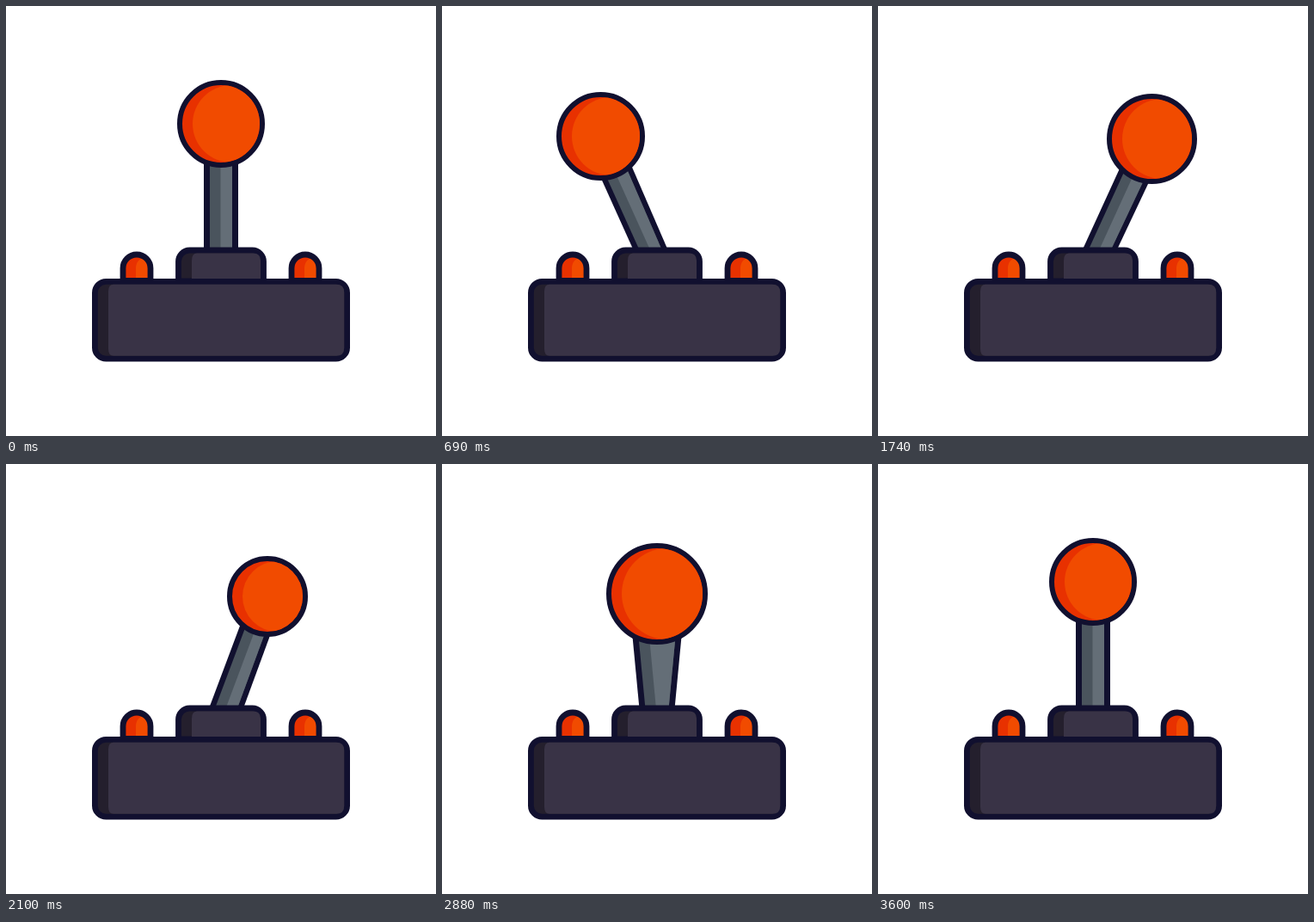
Write an HTML page without scripts that moves like this. It is 500 by 500 pixels and loops after 5630 ms.

```html
<!DOCTYPE html>
<html lang="en">
<head>
<meta charset="utf-8">
<title>Joystick</title>
<style>
@property --x { syntax: "<length>"; inherits: true; initial-value: 250px; }
@property --y { syntax: "<length>"; inherits: true; initial-value: 137px; }
@property --r { syntax: "<length>"; inherits: true; initial-value: 51.3px; }
@property --w { syntax: "<length>"; inherits: true; initial-value: 16px; }

html, body { margin: 0; width: 100%; height: 100%; overflow: hidden; background: #fff; }

/* x, y: knob centre; r: knob radius; w: half width of the rod at the knob */
.stage {
  --ink: #11102f;
  --red: #e83100;
  --orange: #f14b00;
  position: relative;
  width: 500px;
  height: 500px;
  overflow: hidden;
  animation: tilt 5630ms infinite;
}
.stage > * { position: absolute; inset: 0; }
svg { display: block; width: 500px; height: 500px; }

/* rod edges run from the knob centre down to y = 290 */
.rod {
  --foot: calc(232.5px + var(--x) * .07);
  background: var(--ink);
  clip-path: polygon(
    calc(var(--x) + var(--l)) var(--y),
    calc(var(--x) + var(--rt)) var(--y),
    calc(var(--foot) + var(--fr)) 290px,
    calc(var(--foot) + var(--fl)) 290px);
}
.edge { --l: calc(-4px - var(--w)); --rt: calc(var(--w) + 4px); --fl: -20px; --fr: 20px; }
.shade { --l: calc(3px - var(--w)); --rt: calc(var(--w) - 3px); --fl: -13px; --fr: 13px; background: #4a545d; }
.light { --l: calc(3px - var(--w) + min(12.5px, var(--w) - 3px)); --rt: calc(var(--w) - 3px); --fl: -.5px; --fr: 13px; background: #646e77; }

.stage > .knob {
  inset: auto;
  left: calc(var(--x) - var(--r));
  top: calc(var(--y) - var(--r));
  width: calc(var(--r) * 2);
  height: calc(var(--r) * 2);
  box-sizing: border-box;
  border: 6.8px solid var(--ink);
  border-radius: 50%;
  background: var(--red);
  overflow: hidden;
}
.knob::before {
  content: "";
  position: absolute;
  left: 12px;
  top: 0;
  width: 100%;
  height: 100%;
  border-radius: 50%;
  background: var(--orange);
}

@keyframes tilt {
  0% { --x: 250px; --y: 137px; --r: 51.3px; --w: 16px; animation-timing-function: cubic-bezier(.37, 0, .63, 1); }
  11.01% { --x: 183px; --y: 151.6px; --r: 51.6px; --w: 17px; animation-timing-function: cubic-bezier(.36, 0, .67, .48); }
  21.03% { --x: 250px; --y: 153.7px; --r: 62px; --w: 32px; animation-timing-function: cubic-bezier(.33, .52, .64, 1); }
  30.91% { --x: 318px; --y: 154px; --r: 52.5px; --w: 17px; animation-timing-function: cubic-bezier(.4, 0, .7, .6); }
  42.63% { --x: 280px; --y: 153.7px; --r: 37.3px; --w: 12.7px; animation-timing-function: cubic-bezier(.33, .52, .64, 1); }
  44.76% { --x: 250px; --y: 153.7px; --r: 33px; --w: 12px; animation-timing-function: cubic-bezier(.36, 0, .67, .48); }
  48.31% { --x: 250px; --y: 137px; --r: 51.3px; --w: 16px; animation-timing-function: cubic-bezier(.33, .52, .64, 1); }
  52.93% { --x: 250px; --y: 153.7px; --r: 60.5px; --w: 32px; animation-timing-function: cubic-bezier(.37, 0, .63, 1); }
  63.94%, 100% { --x: 250px; --y: 137px; --r: 51.3px; --w: 16px; }
}
</style>
</head>
<body>
<div class="stage">
  <div class="rod edge"></div>
  <div class="rod shade"></div>
  <div class="rod light"></div>
  <svg viewBox="0 0 500 500">
    <defs>
      <g id="button">
        <path d="M-16 320V305a16 16 0 0 1 32 0V320Z" fill="#e83100"/>
        <path d="M-1 320V305C-1 299 2 295 6.500 293Q13 297 13 305V320Z" fill="#f14b00"/>
        <path d="M-16 319.500V305a16 16 0 0 1 32 0V319.500Z" fill="none" stroke="#11102f" stroke-width="6.800"/>
      </g>
    </defs>
    <use href="#button" x="152"/>
    <use href="#button" x="348"/>
    <g stroke="#11102f" stroke-width="6.800" fill="#241f2d">
      <path d="M200.500 320V297a13 13 0 0 1 13-13H286.500a13 13 0 0 1 13 13V320Z"/>
      <rect x="103.400" y="320.400" width="293.200" height="89.800" rx="13"/>
    </g>
    <g fill="#393346">
      <path d="M216 317V296q0-8.500 6-8.500H287.500q8.500 0 8.500 8.500V317Z"/>
      <path d="M125 323.800H384.200q9 0 9 9V397.800q0 9-9 9H125q-6 0-6-8V331.800q0-8 6-8Z"/>
    </g>
  </svg>
  <div class="knob"></div>
</div>
</body>
</html>
```
